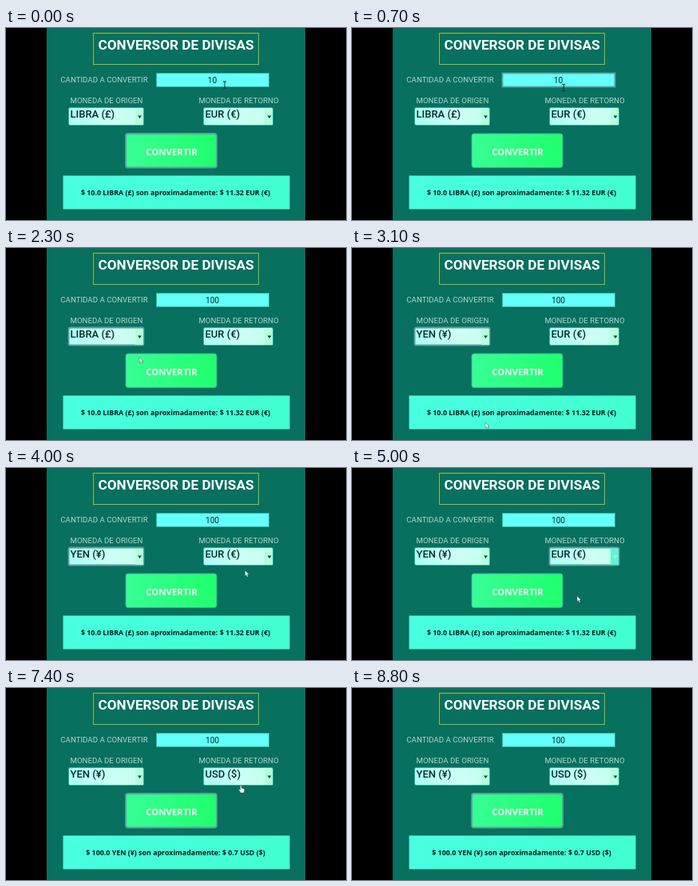
An HTML page that plays this animation: 426 px wide and 240 px high, repeating every 8.9 s.

```html
<!DOCTYPE html>
<html lang="es">
<head>
<meta charset="utf-8">
<title>Conversor de divisas</title>
<style>
  html, body { margin: 0; width: 100%; height: 100%; overflow: hidden; background: #000; }
  svg { display: block; width: 100vw; height: 100vh; }
  text { font-family: Roboto, "Noto Sans", sans-serif; }
  .title { font-size: 17.2px; font-weight: 600; fill: #fff; }
  .label { font-size: 9.7px; fill: #b0d4cd; }
  .amount { font-size: 10.2px; fill: #092c2c; }
  .choice { font-size: 13px; font-weight: 500; fill: #062d29; }
  .action { font: 700 11.4px "Open Sans", "Noto Sans", sans-serif; fill: #f4fff5; }
  .result { font: 700 8.9px "Open Sans", "Noto Sans", sans-serif; fill: #001a16; }
  .middle { text-anchor: middle; }
  .box { stroke: #3cab9b; stroke-width: 1; }
  .focused { stroke: #619da0; stroke-width: 1.8; }
</style>
</head>
<body>
<svg viewBox="0 0 426 240">
  <defs>
    <linearGradient id="comboFill" x2="1" y2="0">
      <stop stop-color="#aafff5"/><stop offset=".6" stop-color="#ccfff3"/><stop offset="1" stop-color="#c4ffea"/>
    </linearGradient>
    <linearGradient id="buttonFill" x2="1" y2="0">
      <stop stop-color="#38ff94"/><stop offset="1" stop-color="#20ff6d"/>
    </linearGradient>
    <linearGradient id="resultFill" x2="1" y2="0">
      <stop stop-color="#48ffe0"/><stop offset="1" stop-color="#42ffd0"/>
    </linearGradient>
  </defs>

  <rect width="426" height="240"/>
  <rect x="51" width="324" height="240" fill="#07705f"/>
  <rect x="109.5" y="6.5" width="207" height="39" fill="none" stroke="#a0b830"/>
  <text class="title middle" x="213" y="27">CONVERSOR DE DIVISAS</text>

  <text class="label middle" x="123" y="67.5">CANTIDAD A CONVERTIR</text>
  <rect id="amountBox" class="box" x="188.5" y="56.5" width="141" height="17" fill="#64fffa"/>
  <text id="amount" class="amount middle" x="258.5" y="69"></text>

  <text class="label middle" x="126" y="93.5">MONEDA DE ORIGEN</text>
  <text class="label middle" x="291.5" y="93.5">MONEDA DE RETORNO</text>
  <rect id="fromBox" class="box" x="78.5" y="99.5" width="94" height="22" rx="2" fill="url(#comboFill)"/>
  <rect x="162" y="101" width="10" height="20" fill="#b4ffdc"/>
  <path d="M165 109.5h5l-2.5 3.5z" fill="#12473c"/>
  <text id="from" class="choice" x="80.5" y="112"></text>

  <rect id="toBox" class="box" x="247.5" y="99.5" width="87" height="22" rx="2" fill="url(#comboFill)"/>
  <rect id="toArrow" x="324" y="101" width="10" height="20"/>
  <path id="toMark" d="M327.5 109.5h5l-2.5 3.5z"/>
  <text id="to" class="choice" x="249.5" y="112"></text>

  <rect id="button" class="box" x="150" y="132" width="114" height="42.5" rx="3" fill="url(#buttonFill)"/>
  <text class="action middle" x="207.5" y="158.5">CONVERTIR</text>
  <rect class="box" x="71.5" y="184.5" width="284" height="42" rx="1" fill="url(#resultFill)"/>
  <text id="result" class="result middle" x="212.5" y="209"></text>

  <g id="cursor">
    <path id="beam" d="M-2 -4h4M0-4v8M-2 4h4" fill="none" stroke="#102f2f"/>
    <path id="arrow" d="M0-3v7l1.6-1.5 1.2 2.7 1.4-.7-1.2-2.5h2z" fill="#fff" stroke="#36564f" stroke-width=".5"/>
    <path id="hand" d="M-1.5-4q1-1 1.5 0v3l3 1q1 .4 .8 1.6L3 5h-4l-2.5-4q.5-1 2 .3z" fill="#fff" stroke="#36564f" stroke-width=".5"/>
  </g>
</svg>
<script>
const DURATION = 8900;
const STEP = 100;
const el = id => document.getElementById(id);

// time, x, y
const cursorPath = [
  [0, 274, 71], [500, 274, 71], [1500, 190, 104], [2000, 167, 111],
  [2900, 167, 221], [3200, 167, 221], [4300, 329, 111], [5000, 282, 163],
  [5500, 282, 163], [6200, 226, 168], [6600, 226, 168],
  [7400, 295, 126], [8200, 295, 126]
];

function cursorAt(time) {
  const next = cursorPath.findIndex(point => point[0] > time);
  if (next < 0) return cursorPath.at(-1).slice(1);
  const [t0, x0, y0] = cursorPath[next - 1];
  const [t1, x1, y1] = cursorPath[next];
  const p = (time - t0) / (t1 - t0);
  const eased = p * p * (3 - 2 * p);
  return [x0 + (x1 - x0) * eased, y0 + (y1 - y0) * eased];
}

const show = (id, visible) => el(id).setAttribute("visibility", visible ? "inherit" : "hidden");
const focus = (id, active) => el(id).classList.toggle("focused", active);
const within = (time, start, end) => time >= start && time < end;

function render(time) {
  el("amount").textContent = time < 900 ? "10" : "100";
  el("from").textContent = time < 2900 ? "LIBRA (£)" : "YEN (¥)";
  el("to").textContent = time < 5500 ? "EUR (€)" : "USD ($)";
  el("result").textContent = time < 6300
    ? "$ 10.0 LIBRA (£) son aproximadamente: $ 11.32 EUR (€)"
    : "$ 100.0 YEN (¥) son aproximadamente: $ 0.7 USD ($)";

  focus("amountBox", within(time, 400, 2000));
  focus("fromBox", within(time, 2000, 4300));
  focus("toBox", within(time, 4300, 6200));
  focus("button", time < 400 || time >= 6200);

  const toActive = within(time, 4300, 5500);
  el("toArrow").setAttribute("fill", toActive ? "#60f4d5" : "#b4ffdc");
  el("toMark").setAttribute("fill", toActive ? "#a4fff0" : "#12473c");

  const [x, y] = cursorAt(time);
  el("cursor").setAttribute("transform", `translate(${x} ${y})`);
  show("cursor", time < 8200);
  show("beam", time < 900);
  show("arrow", within(time, 900, 6000));
  show("hand", time >= 6000);
}

function tick() {
  const time = performance.now() % DURATION;
  render(Math.floor(time / STEP) * STEP);
  requestAnimationFrame(tick);
}
tick();
</script>
</body>
</html>
```
